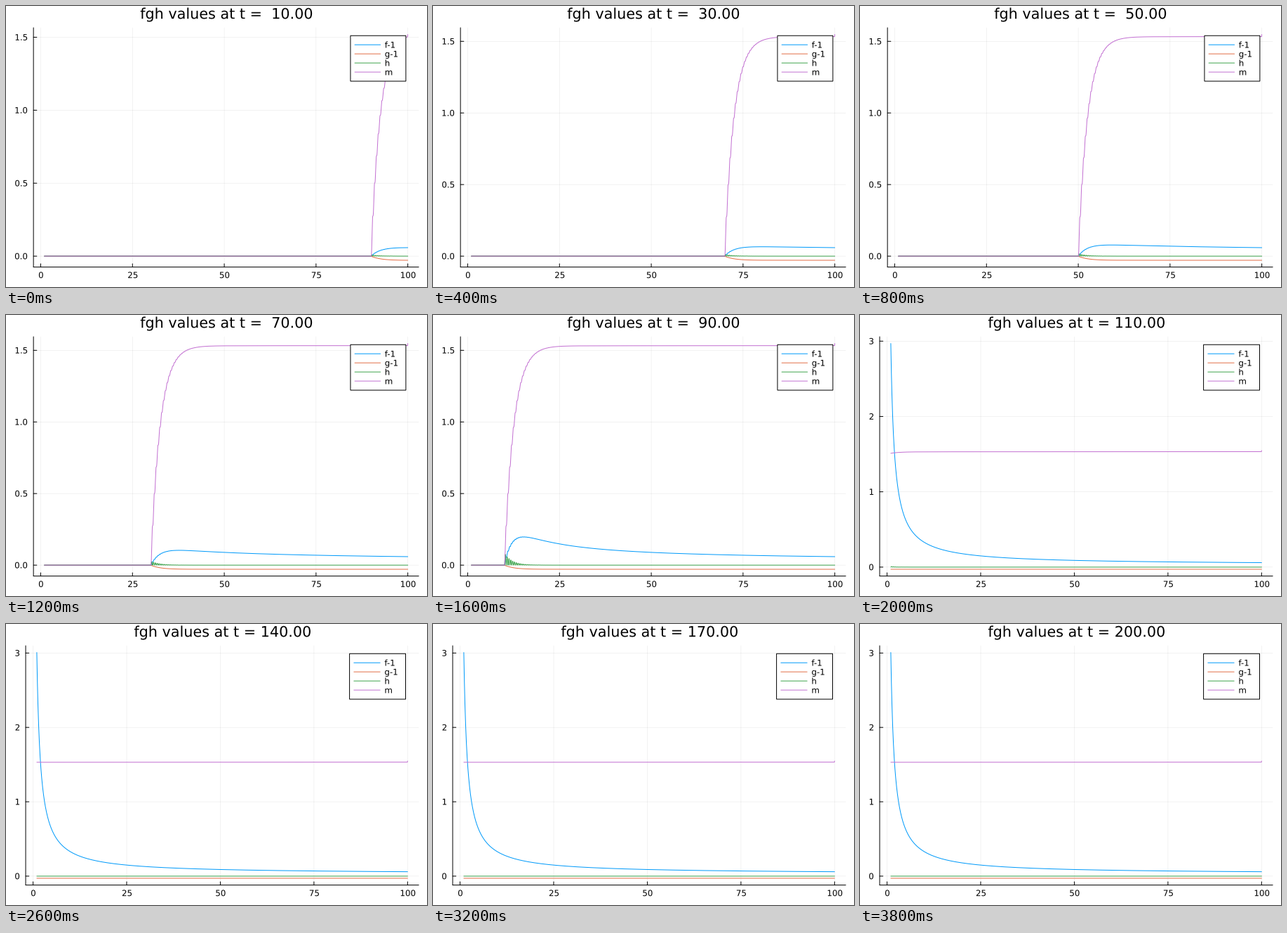
Recreate the animation shown at these times as a matplotlib script. Size 600 by 400 pixels, loop 4000 ms.

```python
import numpy as np
import matplotlib.pyplot as plt
from matplotlib.animation import FuncAnimation
from matplotlib.patches import PathPatch, Rectangle
from matplotlib.textpath import TextPath
from matplotlib.transforms import Affine2D

W, H, DPI = 600, 400, 100
FRAMES, INTERVAL = 20, 200
PX = 72 / DPI
TOP, BOTTOM, RIGHT = 30.87, 371.61, 588.19
SMALL, LARGE = 11.85, 20.74
ROW, TICK, PAD = 12.96, 4.72, 0.03
HALF_TEXT = 4.32
TAU = 2.52

SERIES = [("f-1", "#009afa"), ("g-1", "#e36f47"),
          ("h", "#3ea44e"), ("m", "#c371d2")]

plt.rcParams["font.family"] = "DejaVu Sans"
fig = plt.figure(figsize=(W / DPI, H / DPI), dpi=DPI, facecolor="white")
ax = fig.add_axes([0, 0, 1, 1])

x = np.linspace(1, 100, 1981)


def fields(t):
    """Wave entering at x = 100 and moving inward with unit speed."""
    d = np.maximum(x - (100 - t), 0)
    w = 4 * np.pi
    rise = 1 - np.exp(-(d - np.sin(w * d) / w) / TAU)
    f = (0.0296 + 2.978 / x) * rise
    g = -0.0288 * rise
    h = 0.85 / x * np.sin(w * d / 2) ** 2 * np.exp(-d / TAU)
    m = (1.531 + 0.002 * x / 100) * rise
    m[-1] += 0.015
    return f, g, h, m


def widen(lo, hi):
    pad = PAD * (hi - lo)
    return lo - pad, hi + pad


def line(xs, ys, color="black", width=1.0, **kw):
    ax.plot(xs, ys, color=color, lw=width * PX, snap=False,
            solid_capstyle="round", solid_joinstyle="round", **kw)


def label(px, py, text, size=SMALL, align=0.5, zorder=4):
    """Outlined text; align is 0 for left, 0.5 for centre, 1 for right."""
    path = TextPath((0, 0), text, size=size)
    px -= align * path.get_extents().x1
    place = Affine2D().scale(1, -1).translate(px, py)
    ax.add_patch(PathPatch(place.transform_path(path), fc="black", lw=0,
                           snap=False, zorder=zorder))


def draw_legend(left):
    area = RIGHT - left
    gap, sample = area / 90, area / 15
    x1 = RIGHT - area / 30
    x0 = x1 - (2 * gap + sample + 1.632 * SMALL + 10.8)
    y0 = TOP + (BOTTOM - TOP) / 30
    ax.add_patch(Rectangle((x0, y0), x1 - x0, ROW * (len(SERIES) + 1),
                           fc="white", ec="black", lw=PX, snap=False,
                           zorder=5))
    start = x0 + gap
    end = start + sample
    for i, (name, color) in enumerate(SERIES, 1):
        y = y0 + ROW * i
        line([start, end], [y, y], color, zorder=6)
        label(end + gap, y + HALF_TEXT, name, align=0, zorder=6)


def draw(i):
    ax.clear()
    ax.set(xlim=(0, W), ylim=(H, 0))
    ax.set_axis_off()

    t = 10.0 * (i + 1)
    curves = fields(t)
    y_lo, y_hi = widen(min(c.min() for c in curves),
                       max(c.max() for c in curves))
    x_lo, x_hi = widen(x[0], x[-1])
    tall = y_hi > 2
    left = 28.04 if tall else 39.15

    def to_x(v):
        return left + (v - x_lo) / (x_hi - x_lo) * (RIGHT - left)

    def to_y(v):
        return BOTTOM - (v - y_lo) / (y_hi - y_lo) * (BOTTOM - TOP)

    for v in range(0, 101, 25):
        px = to_x(v)
        line([px, px], [TOP, BOTTOM], width=0.5, alpha=0.1)
        line([px, px], [BOTTOM, BOTTOM - TICK])
        label(px, 387.21, str(v))

    step, fmt = (1.0, "%.0f") if tall else (0.5, "%.1f")
    for v in np.arange(4) * step:
        py = to_y(v)
        line([left, RIGHT], [py, py], width=0.5, alpha=0.1)
        line([left, left + TICK], [py, py])
        label(left - 9, py + HALF_TEXT, fmt % v, align=1)

    line([left, left], [TOP, BOTTOM])
    line([left, RIGHT], [BOTTOM, BOTTOM])

    for (_, color), c in zip(SERIES, curves):
        line(to_x(x), to_y(c), color, zorder=3)

    draw_legend(left)
    label((left + RIGHT) / 2, 18.14, "fgh values at t = %6.2f" % t, LARGE)
    return []


anim = FuncAnimation(fig, draw, frames=FRAMES, interval=INTERVAL,
                     init_func=lambda: [], repeat=True, repeat_delay=0)
plt.show()
```
